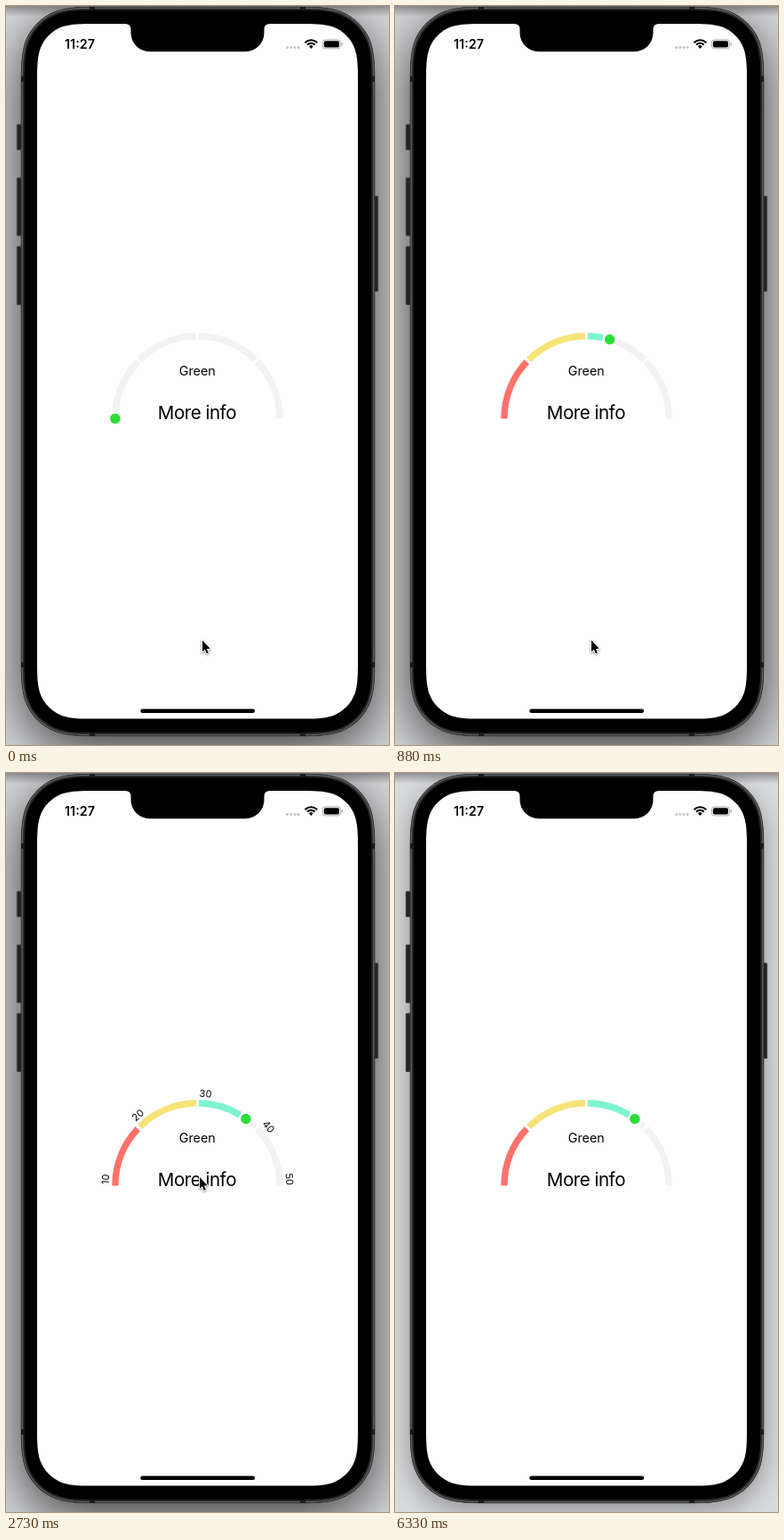
An HTML page with a canvas that plays this animation: 431 px wide and 830 px high, repeating every 6430 ms.

```html
<!DOCTYPE html>
<html lang="en">
<head>
<meta charset="utf-8">
<title>Gauge</title>
<style>
html, body { margin: 0; width: 100%; height: 100%; overflow: hidden; background: #dadbdd; }
canvas { display: block; width: 431px; height: 830px; }
</style>
</head>
<body>
<canvas id="stage"></canvas>
<script>
const W = 431, H = 830, LOOP = 6430;
const FONT = 'Inter, "Liberation Sans", sans-serif';
const canvas = document.getElementById('stage');
const dpr = window.devicePixelRatio || 1;
canvas.width = W * dpr;
canvas.height = H * dpr;
let ctx = canvas.getContext('2d');

const CX = 215.5, CY = 463.4, R = 92.6, BAND = 7.4;
const SWEEP = 126, DOT_GAP = 5, SPLIT = 1, PITCH = 45.5;
const COLORS = ['#ff716b', '#f6e377', '#7cf4cf', '#f2f2f2'];
const LABELS = [['10', 4], ['20', 49.7], ['30', 95], ['40', 140.4], ['50', 176]];
const ARROW = [[0, 0], [0, 12.8], [2.8, 10.2], [4.9, 14.8], [6.9, 13.9], [4.9, 9.4], [8.8, 9.2]];

const clamp = v => Math.min(1, Math.max(0, v));
const mix = (a, b, u) => a + (b - a) * u;
const smooth = u => u * u * (3 - 2 * u);
const rad = deg => (deg + 180) * Math.PI / 180;

// cubic-bezier(0, 0, .58, 1)
function easeOut(x) {
  let lo = 0, hi = 1;
  for (let i = 0; i < 20; i++) {
    const m = (lo + hi) / 2;
    if (1.74 * m * m - 0.74 * m * m * m < x) lo = m; else hi = m;
  }
  return smooth(lo);
}

function box(x, y, w, h, r, fill) {
  ctx.beginPath();
  ctx.roundRect(x, y, w, h, r);
  ctx.fillStyle = fill;
  ctx.fill();
}

// rectangle with continuous-curvature corners
function squircle(x, y, w, h, r, fill) {
  const a = 1.5287 * r, b = 1.0885 * r, c = 0.8684 * r, d = 0.6315 * r;
  const e = 0.3728 * r, f = 0.1691 * r, g = 0.0749 * r;
  const corners = [[x, y, 1, 0], [x + w, y, 0, 1], [x + w, y + h, -1, 0], [x, y + h, 0, -1]];
  ctx.beginPath();
  for (const [px, py, ux, uy] of corners) {
    // along = distance on the outgoing edge, back = distance on the incoming edge
    const at = (along, back) => [px + ux * along - uy * back, py + uy * along + ux * back];
    ctx.lineTo(...at(0, a));
    ctx.bezierCurveTo(...at(0, b), ...at(0, c), ...at(g, d));
    ctx.bezierCurveTo(...at(f, e), ...at(e, f), ...at(d, g));
    ctx.bezierCurveTo(...at(c, 0), ...at(b, 0), ...at(a, 0));
  }
  ctx.closePath();
  ctx.fillStyle = fill;
  ctx.fill();
}

function disc(x, y, r, fill) {
  ctx.beginPath();
  ctx.arc(x, y, r, 0, 7);
  ctx.fillStyle = fill;
  ctx.fill();
}

function text(str, x, y, size, weight = 400, spacing = 0) {
  ctx.font = `${weight} ${size}px ${FONT}`;
  ctx.letterSpacing = spacing + 'px';
  ctx.fillStyle = '#000';
  ctx.textAlign = 'center';
  ctx.textBaseline = 'alphabetic';
  ctx.fillText(str, x, y);
}

function backdrop(active) {
  ctx.fillStyle = '#dadbdd';
  ctx.fillRect(0, 0, W, H);
  ctx.save();
  ctx.shadowColor = active ? 'rgba(0,0,0,.74)' : 'rgba(0,0,0,.34)';
  ctx.shadowBlur = (active ? 62 : 30) * dpr;
  ctx.shadowOffsetY = (active ? 16 : 9) * dpr;
  squircle(17, 1, 398, 819, 63, '#000');
  ctx.restore();
  const top = ctx.createLinearGradient(0, 0, 0, 12);
  top.addColorStop(0, 'rgba(0,0,0,.34)');
  top.addColorStop(1, 'rgba(0,0,0,0)');
  ctx.fillStyle = top;
  ctx.fillRect(0, 0, W, 12);
}

function body() {
  for (const [y, h] of [[132.5, 29.5], [192.5, 66], [269.5, 66.5]]) {
    box(11.8, y, 7, h, 1.5, '#4a4a4c');
    box(13, y + 1, 5, h - 2, 1, '#222');
  }
  box(412, 213, 7.2, 108, 1.5, '#4a4a4c');
  box(412, 214, 6, 106, 1, '#222');

  const rings = [[0, '#303032'], [1, '#6c6c6e'], [2, '#2a2a2c'], [4, '#000']];
  for (const [d, fill] of rings) squircle(16.7 + d, 0.8 + d, 398.6 - 2 * d, 819.4 - 2 * d, 63 - d, fill);

  ctx.fillStyle = '#1a1a1b';
  for (const y of [79, 737]) {
    ctx.fillRect(17, y, 4, 6);
    ctx.fillRect(411, y, 4, 6);
  }
  for (const x of [94, 331]) {
    ctx.fillRect(x, 1, 6, 4);
    ctx.fillRect(x, 816, 6, 4);
  }
  squircle(35, 20, 361, 780.5, 45, '#fefefe');
}

function notch() {
  ctx.beginPath();
  ctx.moveTo(134, 19);
  ctx.lineTo(134, 20);
  ctx.quadraticCurveTo(140.5, 20, 140.5, 26);
  ctx.lineTo(140.5, 30);
  ctx.arcTo(140.5, 51.2, 162, 51.2, 21);
  ctx.lineTo(269, 51.2);
  ctx.arcTo(290.5, 51.2, 290.5, 30, 21);
  ctx.lineTo(290.5, 26);
  ctx.quadraticCurveTo(290.5, 20, 297, 20);
  ctx.lineTo(297, 19);
  ctx.fillStyle = '#000';
  ctx.fill();
}

function statusBar() {
  text('11:27', 83, 48, 14.4, 600);
  for (let i = 0; i < 4; i++) disc(316.6 + i * 4.2, 46.4, 1.5, '#c6c6c8');

  ctx.strokeStyle = '#000';
  ctx.lineWidth = 2.1;
  for (const r of [9.3, 5.8]) {
    ctx.beginPath();
    ctx.arc(343.3, 47.6, r, -Math.PI * 0.76, -Math.PI * 0.24);
    ctx.stroke();
  }
  ctx.beginPath();
  ctx.moveTo(343.3, 48);
  ctx.arc(343.3, 47.6, 3.3, -Math.PI * 0.76, -Math.PI * 0.24);
  ctx.fillStyle = '#000';
  ctx.fill();

  ctx.beginPath();
  ctx.roundRect(356.3, 37.9, 20.2, 10, 3);
  ctx.strokeStyle = '#a4a4a6';
  ctx.lineWidth = 0.9;
  ctx.stroke();
  box(357.8, 39.3, 17.2, 7.2, 1.8, '#000');
  box(377.6, 41.2, 1.3, 3.4, 0.7, '#a4a4a6');
}

function band(from, to, color) {
  if (to <= from) return;
  ctx.beginPath();
  ctx.arc(CX, CY, R, rad(from), rad(to));
  ctx.strokeStyle = color;
  ctx.lineWidth = BAND;
  ctx.stroke();
}

function gauge(angle) {
  for (let i = 0; i < 4; i++) {
    const from = Math.max(0, 90 + (i - 2) * PITCH + SPLIT);
    const to = Math.min(180, 90 + (i - 1) * PITCH - SPLIT);
    band(from, Math.min(to, angle - DOT_GAP), COLORS[i]);
    band(Math.max(from, angle + DOT_GAP), to, COLORS[3]);
  }
  disc(CX + R * Math.cos(rad(angle)), CY + R * Math.sin(rad(angle)), 5.7, '#2ade36');
  text('Green', 215.2, 414.8, 14.3);
  text('More info', 214.9, 463.6, 20.6, 400, -0.5);
}

function labels() {
  for (const [str, deg] of LABELS) {
    ctx.save();
    ctx.translate(CX, CY);
    ctx.rotate((deg - 90) * Math.PI / 180);
    text(str, 0, -99.8, 11);
    ctx.restore();
  }
}

function cursorAt(t) {
  if (t >= 5650) return null;
  if (t >= 5470) {
    const u = smooth((t - 5470) / 180);
    return [mix(216, 412, u), mix(455.5, 850, u)];
  }
  if (t >= 4790) {
    const u = clamp((t - 4790) / 90);
    return [mix(218, 216, u), mix(454, 455.5, u)];
  }
  // curved path bulging to the left
  const u = smooth(clamp((t - 2120) / 460)), v = 1 - u;
  return [
    v * v * 221 + 2 * u * v * 201 + u * u * 218,
    mix(712.5, 454, u)
  ];
}

function cursor(x, y) {
  ctx.save();
  ctx.translate(x, y);
  ctx.beginPath();
  ARROW.forEach(p => ctx.lineTo(...p));
  ctx.closePath();
  ctx.lineJoin = 'round';
  ctx.lineWidth = 2;
  ctx.strokeStyle = '#fff';
  ctx.shadowColor = 'rgba(0,0,0,.45)';
  ctx.shadowBlur = 2.5 * dpr;
  ctx.shadowOffsetY = dpr;
  ctx.stroke();
  ctx.shadowColor = 'transparent';
  ctx.fillStyle = '#000';
  ctx.fill();
  ctx.restore();
}

function phoneLayer(active) {
  const layer = document.createElement('canvas');
  layer.width = canvas.width;
  layer.height = canvas.height;
  const main = ctx;
  ctx = layer.getContext('2d');
  ctx.scale(dpr, dpr);
  backdrop(active);
  body();
  notch();
  statusBar();
  box(151.3, 789.6, 128.8, 4.4, 2.2, '#000');
  ctx = main;
  return layer;
}

const focused = phoneLayer(true), blurred = phoneLayer(false);
ctx.scale(dpr, dpr);

function draw(t) {
  ctx.drawImage(t < 6330 ? focused : blurred, 0, 0, W, H);
  gauge(t < 300 ? 0 : SWEEP * easeOut(clamp((t - 262) / 928)));
  if (t >= 2730 && t < 5260) labels();
  const at = cursorAt(t);
  if (at) cursor(...at);
}

const start = performance.now();
function tick() {
  draw((performance.now() - start) % LOOP);
  requestAnimationFrame(tick);
}
tick();
</script>
</body>
</html>
```
